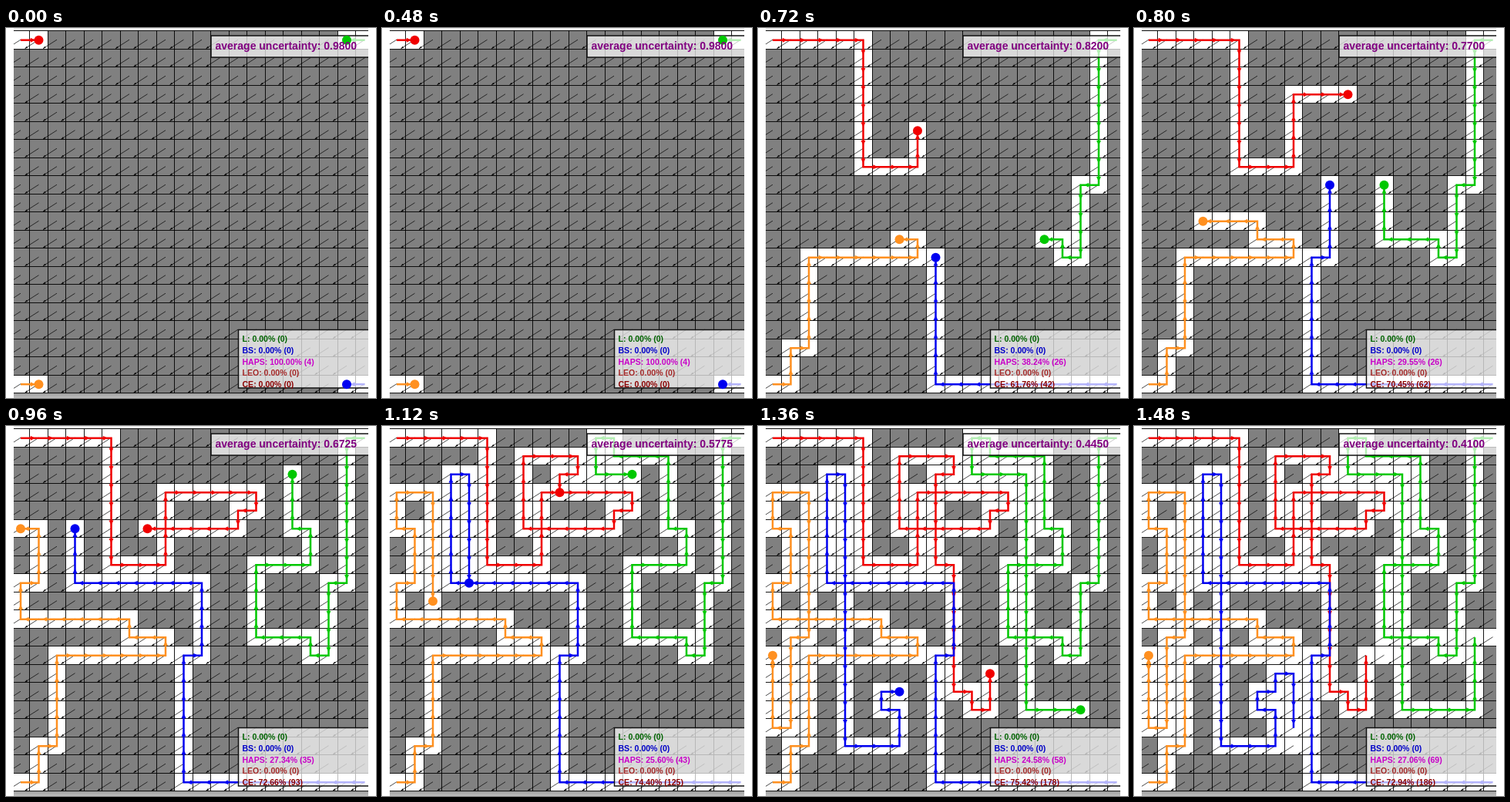
These frames come from a looping animation (480x480 px, 1.96 s). An HTML page with a canvas:

```html
<!DOCTYPE html>
<html lang="en">
<head>
<meta charset="utf-8">
<title>Grid exploration</title>
<style>
  html, body { margin: 0; width: 100%; height: 100%; overflow: hidden; background: #fff; }
  canvas { display: block; width: 480px; height: 480px; }
</style>
</head>
<body>
<canvas id="stage" width="480" height="480"></canvas>
<script>
const ctx = document.getElementById('stage').getContext('2d');
const LOOP = 1960, START = 480, TICK = 40, LAST = 25;
const SIZE = 20, CELL = 23.5;
const cx = c => 19 + c * CELL;
const cy = r => 15.7 + r * CELL;
const DIRS = { R: [1, 0], L: [-1, 0], U: [0, -1], D: [0, 1], S: [0, 0] };

// Turns "R5D7" into the list of visited cells; S stays in place.
function route(col, row, moves) {
  const cells = [[col, row]];
  for (const [, dir, count] of moves.matchAll(/([RLUDS])(\d+)/g)) {
    for (let i = 0; i < +count; i++) {
      col += DIRS[dir][0];
      row += DIRS[dir][1];
      cells.push([col, row]);
    }
  }
  return cells;
}

const agents = [
  { color: '#f00000', cells: route(0, 0, 'R5D7R3U4R5D1L1D1L5U4R3D1L1D5R1D7R1D1R1U3S4R1') },
  { color: '#ff9020', stays: true,
    cells: route(0, 19, 'R1U2R1U5R6U1L2U1L6U2R1U3L1U2R2D8L1D5L1U4' + 'D1U1'.repeat(4)) },
  { color: '#00c800', cells: route(19, 0, 'L1D8L1D4L1U1L3U4R3U2L1U4L3U1L1D2R3D13R4U4R1') },
  { color: '#0000f0', cells: route(19, 19, 'L10U7R1U4L7U6R1D15R3U2L1U1R1U1R1D4') }
];

// [tick, moves made] and [moves made, HAPS messages]
const PACE = [[0, 1], [4, 11], [8, 22], [16, 42], [22, 59], [24, 64], [25, 65]];
const HAPS = [[1, 4], [11, 26], [22, 26], [42, 43], [59, 58], [65, 69]];

function lerpTable(table, x) {
  let i = 1;
  while (i < table.length - 1 && x > table[i][0]) i++;
  const [x0, y0] = table[i - 1], [x1, y1] = table[i];
  return Math.round(y0 + (y1 - y0) * (x - x0) / (x1 - x0));
}

function line(x0, y0, x1, y1) {
  ctx.beginPath();
  ctx.moveTo(x0, y0);
  ctx.lineTo(x1, y1);
  ctx.stroke();
}

function head(x, y, angle, length, half) {
  ctx.save();
  ctx.translate(x, y);
  ctx.rotate(angle);
  ctx.beginPath();
  ctx.moveTo(0, 0);
  ctx.lineTo(-length, -half);
  ctx.lineTo(-length, half);
  ctx.fill();
  ctx.restore();
}

function drawField(visited) {
  ctx.fillStyle = '#808080';
  ctx.fillRect(10, 3, 460, 470.5);
  ctx.fillStyle = '#fff';
  for (const id of visited) {
    const c = id % SIZE, r = Math.floor(id / SIZE);
    ctx.fillRect(cx(c) - CELL / 2, cy(r) - CELL / 2, CELL, CELL);
  }
  ctx.strokeStyle = ctx.fillStyle = '#000';
  ctx.lineWidth = 0.9;
  for (let i = 0; i <= SIZE; i++) {
    const x = Math.floor(cx(i) - CELL / 2) + 0.5;
    const y = Math.floor(cy(i) - CELL / 2) + 0.5;
    line(x, 3, x, 473.5);
    line(10, y, 470, y);
  }
  ctx.lineWidth = 0.7;
  const angle = Math.atan2(11.5, -18);
  for (let r = 0; r < SIZE; r++) {
    for (let c = 0; c <= SIZE; c++) {
      const x = cx(c), y = cy(r) - 0.5;
      line(x, y, x - 18, y + 11.5);
      head(x - 18, y + 11.5, angle, 3.5, 1.2);
    }
  }
}

function drawTrail(cells, color) {
  ctx.strokeStyle = ctx.fillStyle = color;
  ctx.lineWidth = 2.5;
  ctx.beginPath();
  cells.forEach(([c, r]) => ctx.lineTo(cx(c), cy(r)));
  ctx.stroke();
  for (let i = 1; i < cells.length; i++) {
    const [c, r] = cells[i - 1];
    const dx = cells[i][0] - c, dy = cells[i][1] - r;
    if (dx || dy) head(cx(c + dx * 0.8), cy(r + dy * 0.8), Math.atan2(dy, dx), 6, 3);
  }
}

function panel(x, y, height) {
  ctx.fillStyle = 'rgba(255,255,255,.7)';
  ctx.fillRect(x, y, 220, height);
  ctx.strokeStyle = '#111';
  ctx.lineWidth = 1.5;
  ctx.strokeRect(x, y, 220, height);
}

function text(str, x, y, size, color) {
  ctx.font = `bold ${size}px "Liberation Sans", Arial, sans-serif`;
  ctx.fillStyle = color;
  ctx.fillText(str, x, y);
}

function drawLabels(moves, seen) {
  text('average uncertainty: ' + (1 - seen / 400).toFixed(4), 271.5, 28, 14, '#800080');
  const total = Math.min(4 * moves, 255);
  const haps = lerpTable(HAPS, moves);
  const rows = [
    ['L', 0, '#006400'], ['BS', 0, '#0000c8'], ['HAPS', haps, '#c800c8'],
    ['LEO', 0, '#a52a2a'], ['CE', total - haps, '#8b0000']
  ];
  rows.forEach(([name, n, color], i) =>
    text(`${name}: ${(100 * n / total).toFixed(2)}% (${n})`, 306.5, 407.3 + i * 14.7, 10.55, color));
}

function draw(tick) {
  const moves = lerpTable(PACE, tick);
  const done = tick === LAST;
  const visited = new Set();
  for (const { cells } of agents) {
    cells.slice(0, moves + 1).forEach(([c, r]) => visited.add(r * SIZE + c));
  }
  const trails = agents.map(a => a.cells.slice(0, moves + (done ? 0 : 1)));

  ctx.fillStyle = '#fff';
  ctx.fillRect(0, 0, 480, 480);
  ctx.fillStyle = '#eee';
  ctx.fillRect(10, 0, 460, 3);
  const shade = ctx.createLinearGradient(0, 473, 0, 480);
  shade.addColorStop(0, '#969696');
  shade.addColorStop(1, '#c0c0c0');
  ctx.fillStyle = shade;
  ctx.fillRect(10, 473.5, 460, 6.5);

  ctx.save();
  ctx.beginPath();
  ctx.rect(10, 3, 460, 471);
  ctx.clip();
  drawField(visited);
  agents.forEach((a, i) => drawTrail(trails[i], a.color));
  panel(266, 10, 28);
  panel(301.5, 391.5, 75.5);
  agents.forEach((a, i) => {
    if (done && !a.stays) return;
    const [c, r] = trails[i][trails[i].length - 1];
    ctx.fillStyle = a.color;
    ctx.beginPath();
    ctx.arc(cx(c), cy(r), 6, 0, 2 * Math.PI);
    ctx.fill();
  });
  drawLabels(moves, visited.size);
  ctx.restore();
}

const origin = performance.now();
let shown = -1;
function play() {
  const t = (performance.now() - origin) % LOOP;
  const tick = Math.max(0, Math.min(LAST, Math.floor((t - START) / TICK)));
  if (tick !== shown) draw(shown = tick);
  requestAnimationFrame(play);
}
play();
</script>
</body>
</html>
```
